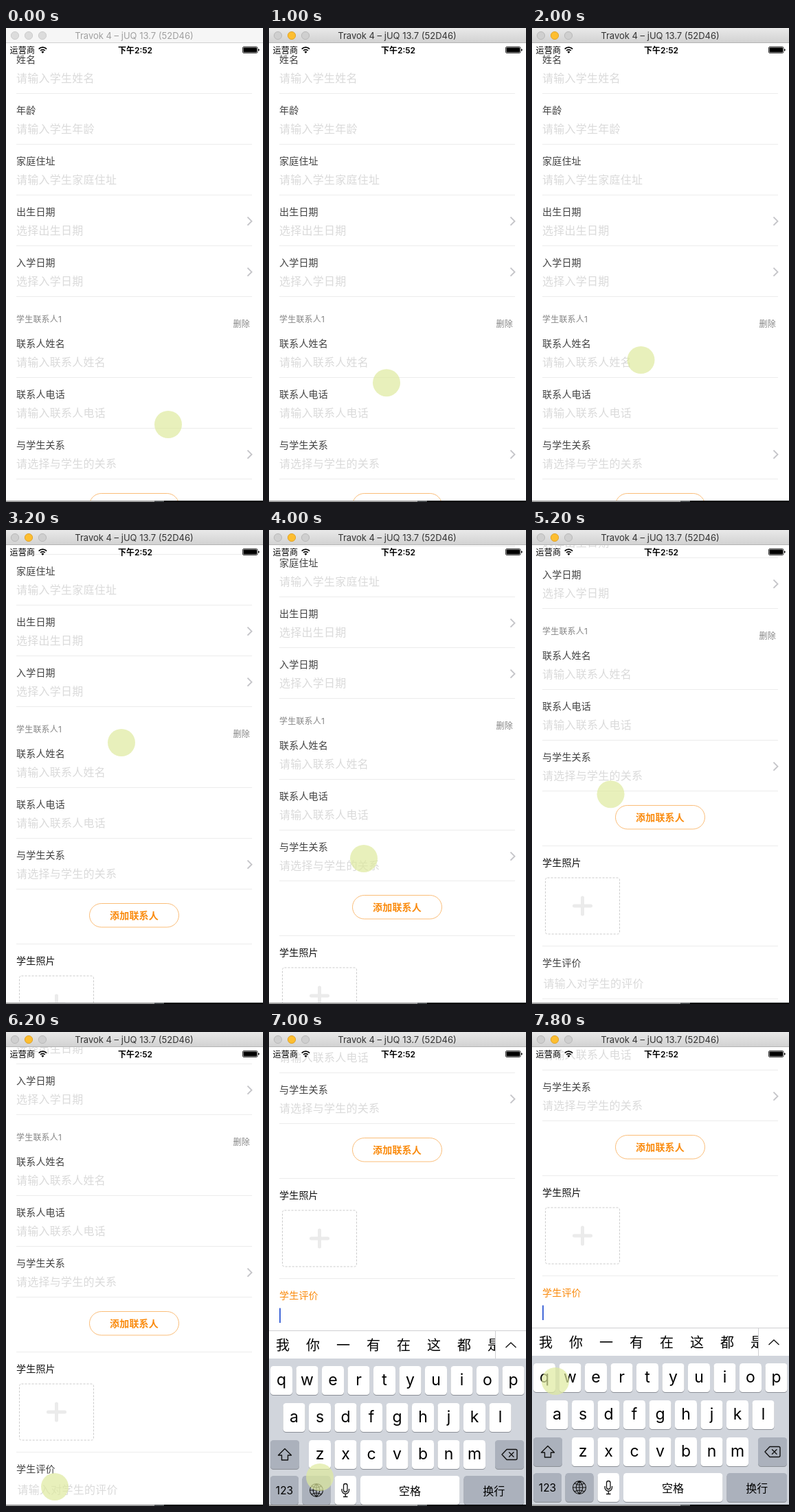
An HTML page that plays this animation: 374x691 px, repeating every 8 s.

```html
<!DOCTYPE html>
<html lang="zh-CN">
<head>
<meta charset="utf-8">
<title>学生信息</title>
<style>
html, body { margin: 0; width: 100%; height: 100%; overflow: hidden; background: #fff; }
svg { display: block; width: 374px; height: 691px; }
text { font-family: Inter, "Noto Sans CJK SC", "Noto Sans CJK", sans-serif; white-space: pre; }
</style>
</head>
<body>
<svg id="stage" viewBox="0 0 374 691" xmlns="http://www.w3.org/2000/svg">
  <defs>
    <linearGradient id="bar" x2="0" y2="1"><stop stop-color="#e9e9e9"/><stop offset="1" stop-color="#d1d1d1"/></linearGradient>
    <clipPath id="screen"><rect y="22" width="374" height="667"/></clipPath>
    <clipPath id="words"><rect y="431" width="329" height="42"/></clipPath>
  </defs>
  <rect width="374" height="691" fill="#fff"/>
  <g clip-path="url(#screen)">
    <g id="form"></g>
    <g id="keys"></g>
  </g>
  <g id="status"></g>
  <g id="title"></g>
  <g id="edge"></g>
  <circle id="touch" r="20" fill="#deea9f" fill-opacity=".7"/>
</svg>
<script>
const LOOP = 8000, STEP = 200;
const ORANGE = '#fa8a0c', LABEL = '#424242', HINT = '#dadada', SMALL = '#858585';
const $ = id => document.getElementById(id);

function add(parent, tag, attrs, content) {
  const el = document.createElementNS('http://www.w3.org/2000/svg', tag);
  for (const k in attrs) el.setAttribute(k, attrs[k]);
  if (content !== undefined) el.textContent = content;
  parent.appendChild(el);
  return el;
}
// Text placed by the vertical middle of its glyphs
const text = (g, x, mid, s, size, fill, more) =>
  add(g, 'text', { x, y: mid + size * 0.375, 'font-size': size, fill, ...more }, s);
const rect = (g, x, y, width, height, fill, more) =>
  add(g, 'rect', { x, y, width, height, fill, ...more });
const path = (g, d, stroke, width, more) =>
  add(g, 'path', { d, stroke, 'stroke-width': width, fill: 'none', ...more });
const centered = { 'text-anchor': 'middle' };

// Form
const form = $('form');
const label = (y, s, fill = LABEL) => text(form, 15, y, s, 14, fill, { 'letter-spacing': 0.2 });
const hint = (y, s, x = 15) => text(form, x, y, s, 16, HINT, { 'letter-spacing': 0.25, 'font-weight': 300 });
const rule = y => rect(form, 15, y, 343, 1, '#ececec');

function field(y, name, prompt, opens) {
  label(y, name);
  hint(y + 27.3, prompt);
  rule(y + 49);
  if (opens) path(form, `M351.5 ${y + 7.7}l6 6l-6 6`, '#c5c5c9', 1.9);
}
field(46, '姓名', '请输入学生姓名');
field(120, '年龄', '请输入学生年龄');
field(194, '家庭住址', '请输入学生家庭住址');
field(268, '出生日期', '选择出生日期', true);
field(342, '入学日期', '选择入学日期', true);
text(form, 15, 424.3, '学生联系人1', 12, SMALL, { 'letter-spacing': 0.2 });
text(form, 330.5, 431.5, '删除', 12, SMALL, { 'letter-spacing': 0.2 });
field(460, '联系人姓名', '请输入联系人姓名');
field(534, '联系人电话', '请输入联系人电话');
field(608, '与学生关系', '请选择与学生的关系', true);

rect(form, 121.5, 678.5, 130, 34.5, '#fff', { rx: 17.25, stroke: '#fbbd78' });
text(form, 186.5, 695.7, '添加联系人', 14, ORANGE, { ...centered, 'font-weight': 700, 'letter-spacing': 0.2 });
rule(737);
label(762, '学生照片', '#141414');
rect(form, 19.5, 784, 108, 82, 'none', { rx: 3, stroke: '#cbcbcb', 'stroke-dasharray': '3 2' });
path(form, 'M61.5 825h24M73.5 813v24', '#ebebeb', 5, { 'stroke-linecap': 'round' });
rule(883);
const remark = label(908, '学生评价');
const remarkHint = hint(937.6, '请输入对学生的评价', 16.5);
const caret = rect(form, 15, 926.5, 2, 21.5, '#4469d8');
rule(960);

// Keyboard
const keys = $('keys');
rect(keys, 0, 431, 374, 42, '#fff');
rect(keys, 0, 431, 374, 1, '#cfcfd2');
rect(keys, 0, 472, 374, 260, '#d1d5dc');
const words = add(keys, 'g', { 'clip-path': 'url(#words)' });
[...'我你一有在这都是'].forEach((c, i) => text(words, 20 + 44 * i, 452, c, 20, '#000', centered));
rect(keys, 329, 432, 1, 40, '#cfcfd2');
path(keys, 'M344.5 456l7.5-7l7.5 7', '#111', 1.3);

function key(x, y, w, fill = '#fff') {
  rect(keys, x, y + 1, w, 42, '#8b8f96', { rx: 4.5 });
  rect(keys, x, y, w, 42, fill, { rx: 4.5 });
}
const GREY = '#abb1bc';
[['qwertyuiop', 2, 483], ['asdfghjkl', 20.5, 537], ['zxcvbnm', 58, 591]].forEach(([row, x0, y]) =>
  [...row].forEach((c, i) => {
    const x = x0 + 37.5 * i;
    key(x, y, 32);
    add(keys, 'text', { x: x + 16, y: y + 28, 'font-size': 23, ...centered }, c);
  }));
key(2, 591, 42, GREY);
key(329, 591, 42, GREY);
key(2, 643, 41, GREY);
key(48.5, 643, 41, GREY);
key(95.5, 643, 31.5);
key(133, 643, 144.5);
key(283.5, 643, 87.5, GREY);
text(keys, 22.5, 664.3, '123', 15.5, '#000', centered);
text(keys, 205, 664.5, '空格', 16, '#000', centered);
text(keys, 327.3, 664.5, '换行', 16, '#000', centered);
const round = { 'stroke-linejoin': 'round', 'stroke-linecap': 'round' };
path(keys, 'M23 603.5l9.5 9.5h-5v7h-9v-7h-5z', '#111', 1.4, round);
path(keys, 'M339 612l7-7.5h13q2 0 2 2v11q0 2-2 2h-13zM349.5 608.7l6.5 6.5m0-6.5l-6.5 6.5', '#111', 1.4, round);
path(keys, 'M59.5 664a9.5 9.5 0 1 0 19 0a9.5 9.5 0 1 0-19 0h19M69 654.5v19' +
  'M69 654.5q-9.5 9.5 0 19q9.5-9.5 0-19M62 658q7 4 14 0M62 670q7-4 14 0', '#111', 1.1);
rect(keys, 108.5, 654.5, 5.5, 12, 'none', { rx: 2.75, stroke: '#111', 'stroke-width': 1.3 });
path(keys, 'M106 662v2a5.25 5.25 0 0 0 10.5 0v-2M111.25 669.5v4M108 673.5h6.5', '#111', 1.3);

// Status bar
const status = $('status');
text(status, 5.5, 32.2, '运营商', 12, '#000', { 'letter-spacing': 0.2 });
path(status, 'M47.7 30.6a8 8 0 0 1 11.4 0M50 33a4.8 4.8 0 0 1 6.8 0', '#000', 1.7);
add(status, 'path', { d: 'M53.4 37l-2-2.2a2.8 2.8 0 0 1 4 0z' });
text(status, 188, 32.2, '下午2:52', 12, '#000', { ...centered, 'font-weight': 600 });
rect(status, 344.5, 27.5, 21.5, 9, 'none', { rx: 1.5, stroke: '#000', 'stroke-width': 0.8 });
rect(status, 345.5, 28.5, 19.5, 7, '#000', { rx: 0.8 });
rect(status, 367, 30.5, 1.5, 3, '#000', { rx: 0.7 });

// Window frame
const title = $('title');
const bar = rect(title, 0, 0, 374, 22, '#f6f6f6');
const barLine = rect(title, 0, 21, 374, 1, '#d0d0d0');
const lights = [13, 33, 53].map(cx => add(title, 'circle', { cx, cy: 11, r: 5.6 }));
const name = add(title, 'text', { x: 186.5, y: 16, 'font-size': 13, ...centered }, 'Travok 4 – jUQ 13.7 (52D46)');
const edge = $('edge');
rect(edge, 0, 689, 230, 1, '#8e8e8e');
rect(edge, 0, 690, 230, 1, '#a9a9a9');
rect(edge, 216, 689, 14, 2, '#55585a');
rect(edge, 230, 689, 144, 2, '#080b10');

// Motion: [time, value, ...]
const touchPath = [
  [0, 236, 578], [1200, 158, 505], [1600, 158.5, 484], [2000, 158.5, 484],
  [2400, 161, 444], [3200, 168, 310], [3400, 168, 298], [3600, 168, 298],
  [4000, 138, 479], [4400, 128, 309], [4800, 126, 300], [5000, 124, 318],
  [6000, 76.5, 654], [6200, 71, 663], [6600, 71, 663], [7000, 74, 649],
  [7600, 36, 528], [7800, 34, 509]
];
const scrollPath = [
  [0, 0], [2400, 0], [3200, 134], [3400, 146], [4000, 146],
  [4400, 293.5], [4800, 298], [5000, 290], [5200, 277], [5400, 272.5], [5600, 271]
];
function at(track, t) {
  const i = track.findIndex(p => p[0] > t);
  if (i < 0) return track[track.length - 1].slice(1);
  const a = track[i - 1], b = track[i], u = (t - a[0]) / (b[0] - a[0]);
  return a.slice(1).map((v, k) => v + (b[k + 1] - v) * u);
}

const RISE = 257.5;
function draw(t) {
  const active = t >= 200, typing = t >= 6600;
  const drop = t >= 7300 ? 0 : RISE * Math.exp(-9.69 * (t - 6570) / 1000);
  const scroll = at(scrollPath, t)[0] + (typing ? RISE - drop - 0.5 : 0);
  form.setAttribute('transform', `translate(0 ${-Math.round(scroll * 2) / 2})`);
  keys.setAttribute('transform', `translate(0 ${Math.round(drop * 2) / 2})`);
  keys.setAttribute('display', typing ? 'inline' : 'none');
  caret.setAttribute('display', typing ? 'inline' : 'none');
  remarkHint.setAttribute('display', typing ? 'none' : 'inline');
  remark.setAttribute('fill', typing ? ORANGE : LABEL);

  bar.setAttribute('fill', active ? 'url(#bar)' : '#f6f6f6');
  barLine.setAttribute('fill', active ? '#b4b4b4' : '#d0d0d0');
  name.setAttribute('fill', active ? '#333' : '#a0a0a0');
  lights.forEach((c, i) => {
    const lit = active && i === 1;
    c.setAttribute('fill', lit ? '#fdbe30' : active ? '#cfcfcf' : '#dcdcdc');
    c.setAttribute('stroke', lit ? '#e0a32a' : active ? '#b9b9b9' : '#cccccc');
  });

  const [x, y] = at(touchPath, t);
  $('touch').setAttribute('transform', `translate(${x} ${y})`);
}

function frame() {
  const t = performance.now() % LOOP;
  draw(Math.floor(t / STEP) * STEP);
  requestAnimationFrame(frame);
}
frame();
</script>
</body>
</html>
```
